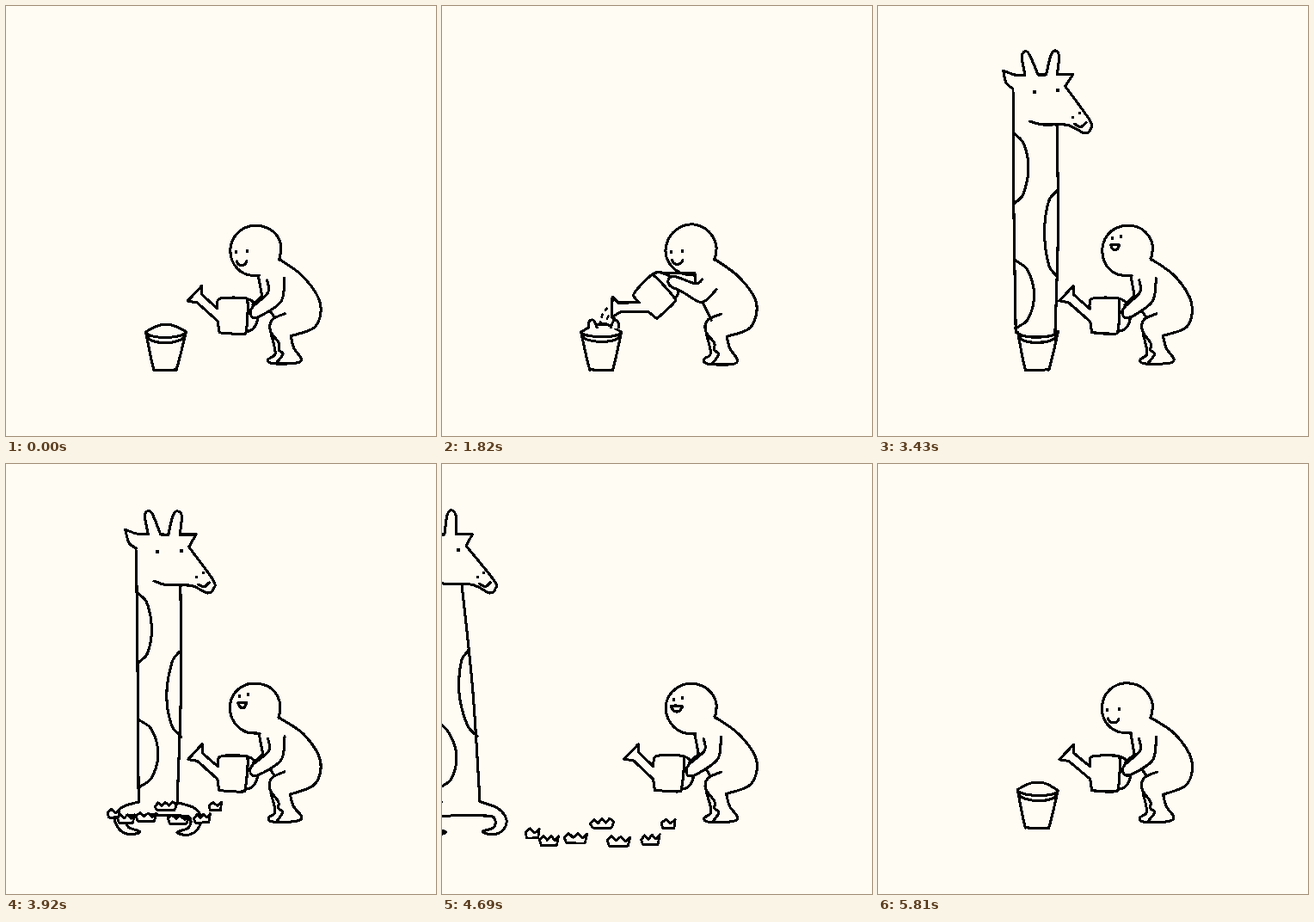
Write an HTML page with a canvas that moves like this. It is 500 px wide and 500 px high and loops after 5880 ms.

```html
<!DOCTYPE html>
<html lang="en">
<head>
<meta charset="utf-8">
<title>Watering</title>
<style>
  html, body { margin: 0; width: 100%; height: 100%; overflow: hidden; background: #fffcf4; }
  canvas { display: block; width: 500px; height: 500px; }
</style>
</head>
<body>
<canvas id="stage" width="500" height="500"></canvas>
<script>
const ctx = document.getElementById('stage').getContext('2d', { willReadFrequently: true });
const SIZE = 500, STEP = 70, FRAMES = 84;
const PAPER = [255, 252, 244];
const SPROUT = 1190, BURST = 3850, GONE = 5180, RESET = 5530;

const lerp = (a, b, p) => a + (b - a) * p;
const ramp = (t, a, b) => Math.max(0, Math.min(1, (t - a) / (b - a)));
const ease = p => p * p * (3 - 2 * p);
const rand = n => {
  const v = Math.sin(n * 127.1 + 11.7) * 43758.5453;
  return v - Math.floor(v);
};
const steps = (n, make) => Array.from({ length: n + 1 }, (_, i) => make(i / n, i));

// "x,y" key points; a trailing "!" marks a sharp corner.
const parse = s => s.split(' ').flatMap(token => {
  const p = token.split(',').map(parseFloat);
  return token.endsWith('!') ? [p, p] : [p];
});
const arc = (cx, cy, rx, ry, from, to) => steps(10, u => {
  const a = lerp(from, to, u) * Math.PI / 180;
  return [cx + rx * Math.cos(a), cy + ry * Math.sin(a)];
});
const spot = (x, y, w, h) =>
  steps(10, u => [x + w * Math.sqrt(Math.abs(Math.sin(Math.PI * u))), y + h * u]);
const horn = (left, right, tip) =>
  parse(`${left},80! ${tip - 5},58 ${tip},52 ${tip + 5},58 ${right},80!`);
const blend = ([a, b], p) => a.map(([x, y], i) => [lerp(x, b[i][0], p), lerp(y, b[i][1], p)]);

// Person
const BODY = [
  ...arc(290, 284, 29.5, 29.5, 80, 380),
  ...parse('317,294! 346,315 365,345 359,373 331,384! 335,398 344,411 337,416 310,416 305,411 313,404 308,382')
];
const LEG = parse('324,358 309,365 307,378 317,392 317,400 322,405 315,415');
const ARM = ['324,317 320,343 298,359 287,362 284,355 288,348 305,333 304,319',
             '319,329 302,345 278,332 265,325 264,317 272,315 295,323 303,318'].map(parse);
const LIMBS = [
  ['294,313 298,336', '294,311 295,323'],
  ['287,347 298,337', '258,311 294,311'],
  ['306,353 311,361', '303,345 313,365']
].map(pair => pair.map(parse));
const SMILE = arc(274, 295, 6, 6, 170, 10);
const SMILE_EYES = [[267, 286], [280, 285]];
const OPEN_EYES = [[269, 275], [279, 273]];

// Watering can
const CAN = parse('281,344 276,339 250,340 246,346 246,352! 228,336! 228,326! 211,343! 222,345! 246,367! 248,380! 274,381 279,376');
const HANDLE = arc(280, 359, 13, 19, -90, 90);

// Pot
const MOUND = steps(8, u => [162 + 47 * u, 379 - 9 * Math.sin(Math.PI * u)]);
const POT = [...arc(185.5, 379, 23.5, 6, 0, 180), ...parse('162,379! 171,419 175,423 196,423 200,419 209,379!')];
const BAND = arc(185.5, 384, 21, 7, 0, 180);

// Giraffe
const HEAD = [
  ...parse('157,96! 149,90 145,75! 159,80'),
  ...horn(171, 186, 172), ...horn(195, 208, 205),
  ...parse('227,80! 218,94! 246,133 247,143 240,148 220,139 192,138 177,134')
];
const MUZZLE = parse('229,138 236,141 242,136');
const NOSTRILS = [[227, 130], [235, 125]];
const EYES = [[182, 100], [209, 98]];
const NECK = ['157,95 158,230 160,391', '208,138 209,260 205,391'].map(parse);
const SPOTS = [spot(158, 148, 17, 82), spot(209, 214, -16, 101), spot(159, 295, 23, 80)];
const FOOT = parse('160,391 140,398 132,411 138,424 150,429 161,426 148,421 145,412 154,407');
const FEET = [...FOOT, ...FOOT.map(([x, y]) => [365 - x, y]).reverse()];

// Jagged potsherds, the widest in the middle
const SHARDS = parse('105,430 124,439 155,436 186,418 205,439 242,438 263,419').map(([x, y], i) => {
  const w = 8 + 6 * Math.sin(Math.PI * i / 6);
  const teeth = Math.round(w / 2.4);
  const tilt = (rand(i) - .5) * 5;
  const top = steps(teeth, (u, k) => [lerp(-w, w, u), (k % 2 ? -6 : -1) + tilt * (u - .5)]);
  const edge = [...top, [w * .8, 5], [-w * .8, 5]];
  return { x, y, w, edge: edge.flatMap(p => [p, p]) };
});

let phases = [];
const still = p => p;
let place = still;

function placed(move, paint) {
  place = move;
  paint();
  place = still;
}

// Hand-drawn boil: a smooth wobble with new phases on every step.
function warp(p) {
  const [x, y] = place(p);
  return [
    x + .45 * Math.sin(y * .06 + phases[0]) + .3 * Math.sin(x * .13 + phases[1]),
    y + .45 * Math.sin(x * .06 + phases[2]) + .3 * Math.sin(y * .13 + phases[3])
  ];
}

// Smooth curve through the points (Catmull-Rom).
function trace(points, closed) {
  const p = points.map(warp), n = p.length;
  const at = i => closed ? p[(i + n) % n] : p[Math.max(0, Math.min(n - 1, i))];
  ctx.beginPath();
  ctx.moveTo(...p[0]);
  for (let i = 0; i < (closed ? n : n - 1); i++) {
    const [a, b, c, d] = [at(i - 1), at(i), at(i + 1), at(i + 2)];
    if (Math.hypot(b[0] - c[0], b[1] - c[1]) < .01) continue;
    ctx.bezierCurveTo(
      b[0] + (c[0] - a[0]) / 6, b[1] + (c[1] - a[1]) / 6,
      c[0] - (d[0] - b[0]) / 6, c[1] - (d[1] - b[1]) / 6, c[0], c[1]);
  }
  if (closed) ctx.closePath();
}

function draw(points, { closed = false, fill = false, stroke = true } = {}) {
  trace(points, closed);
  ctx.fillStyle = `rgb(${PAPER})`;
  if (fill) ctx.fill();
  if (stroke) ctx.stroke();
}

function dots(points, w = 3, h = w) {
  ctx.fillStyle = '#000';
  for (const p of points) {
    const [x, y] = warp(p);
    ctx.fillRect(Math.round(x - w / 2), Math.round(y - h / 2), w, h);
  }
}

function water(t) {
  if (t < 910 || t >= 2400) return;
  ctx.save();
  ctx.lineWidth = 2.6;
  ctx.setLineDash([3, 6]);
  ctx.lineDashOffset = -t * .09;
  for (let i = 0; i < 3; i++) {
    const x = 184 + 6.5 * i, y = 348 + 7 * i;
    ctx.beginPath();
    ctx.moveTo(202, y);
    ctx.quadraticCurveTo(x + 2, y + 1, x, 370);
    ctx.stroke();
  }
  ctx.restore();
}

function neck(free) {
  const [left, right] = NECK;
  draw([...left, ...[...right].reverse()], { fill: true, stroke: false });
  if (free) draw(FEET, { fill: true });
  NECK.concat(SPOTS).forEach(s => draw(s));
}

function head() {
  draw(HEAD, { fill: true });
  draw(MUZZLE);
  dots(EYES, 4);
  dots(NOSTRILS);
}

function pot() {
  draw(POT, { closed: true, fill: true });
  draw(BAND);
}

// Maps giraffe points to the stage: squashed in the pot, then walking off.
function giraffePose(t, rise) {
  const squash = Math.min(1, rise / 250);
  const sx = 1 - .18 * squash, sy = 1 - .1 * squash;
  const walk = -77 * Math.max(0, (t - BURST) / 490) ** 1.35;
  const sway = t > 3500 && t < BURST ? .02 * Math.sin((t - 3500) / 50) : 0;
  const lean = sway + .1 * ramp(t, 4340, 4620);
  const drop = 2 * ramp(t, BURST, BURST + STEP);
  return ([x, y]) => [
    185 + (x - 185) * sx + walk + lean * (y - 400),
    100 + (y - 100) * sy + rise + drop
  ];
}

function plant(t) {
  const potted = t < BURST || t >= RESET;
  const grown = t >= SPROUT && t < GONE;
  const rise = 328 - 22 * ramp(t, SPROUT, 1890) - 59 * ramp(t, 1890, 2590) - 247 * ease(ramp(t, 2620, 3400));
  const hidden = rise >= 275;
  const pose = giraffePose(t, rise);

  if (potted && (!grown || hidden)) draw(MOUND, { fill: true });
  if (grown) {
    ctx.save();
    ctx.beginPath();
    if (!potted) ctx.rect(0, 0, SIZE, SIZE);
    else if (hidden) ctx.rect(158, 0, 53, 375);
    else ctx.rect(0, 0, SIZE, 381);
    ctx.clip();
    placed(pose, () => {
      neck(!potted);
      if (hidden) head();
    });
    ctx.restore();
  }
  if (potted) pot();
  if (grown && !hidden) placed(pose, head);
}

function debris(t) {
  if (t < BURST || t >= 5390) return;
  if (t >= GONE) {
    dots(SHARDS.flatMap(({ x, y, w }) => [[x - w * .4, y + 2], [x + w * .4, y + 1]]));
    return;
  }
  const p = 1 - (1 - ramp(t + STEP, BURST, BURST + 280)) ** 2;
  const hop = 22 * Math.sin(Math.PI * p), scale = .6 + .4 * p;
  ctx.save();
  ctx.lineWidth = 2.8;
  if (t >= 5040) ctx.setLineDash(t < 5110 ? [4, 4] : [2, 8]);
  for (const { x, y, edge } of SHARDS) {
    placed(
      ([u, v]) => [lerp(186, x, p) + u * scale, lerp(400, y, p) - hop + v * scale],
      () => draw(edge, { closed: true, fill: true }));
  }
  ctx.restore();
}

function face(t) {
  if (t < 3080 || t >= RESET) {
    dots(SMILE_EYES, 3, 4);
    draw(SMILE);
    return;
  }
  const look = ramp(t, 3010, 3220) - ramp(t, 3900, 4900);
  placed(([x, y]) => [x + 3 * look, y - 5 * look], () => {
    dots(OPEN_EYES, 3, 4);
    draw(arc(272.5, 282.5, 6.5 - 2 * look, 7 - look, 0, 180), { closed: true });
  });
}

function can(p) {
  const a = -44 * Math.PI / 180 * p, c = Math.cos(a), s = Math.sin(a);
  placed(([x, y]) => {
    const u = x - 281, v = y - 342;
    return [281 - 34 * p + u * c - v * s, 342 - 29 * p + u * s + v * c];
  }, () => {
    draw(HANDLE);
    draw(CAN, { closed: true, fill: true });
  });
}

function person(t) {
  const pour = ease(ramp(t, 700, 910)) - ease(ramp(t, 2400, 2660));
  draw(BODY);
  draw(LEG);
  face(t);
  LIMBS.forEach(s => draw(blend(s, pour)));
  can(pour);
  draw(blend(ARM, pour), { fill: true });
}

// Hard pixel edges, as from a pencil tool.
function harden() {
  const img = ctx.getImageData(0, 0, SIZE, SIZE), d = img.data;
  for (let i = 0; i < d.length; i += 4) {
    const ink = d[i] < 128;
    for (let c = 0; c < 3; c++) d[i + c] = ink ? 0 : PAPER[c];
  }
  ctx.putImageData(img, 0, 0);
}

function render(frame) {
  const t = frame * STEP;
  phases = steps(3, (_, i) => rand(frame * 4 + i) * Math.PI * 2);
  ctx.fillStyle = `rgb(${PAPER})`;
  ctx.fillRect(0, 0, SIZE, SIZE);
  ctx.strokeStyle = '#000';
  ctx.lineWidth = 3.1;
  ctx.lineCap = ctx.lineJoin = 'round';
  water(t);
  plant(t);
  debris(t);
  person(t);
  harden();
}

const start = performance.now();
let shown = -1;
function tick() {
  const frame = Math.floor((performance.now() - start) / STEP) % FRAMES;
  if (frame !== shown) render(shown = frame);
  requestAnimationFrame(tick);
}
tick();
</script>
</body>
</html>
```
